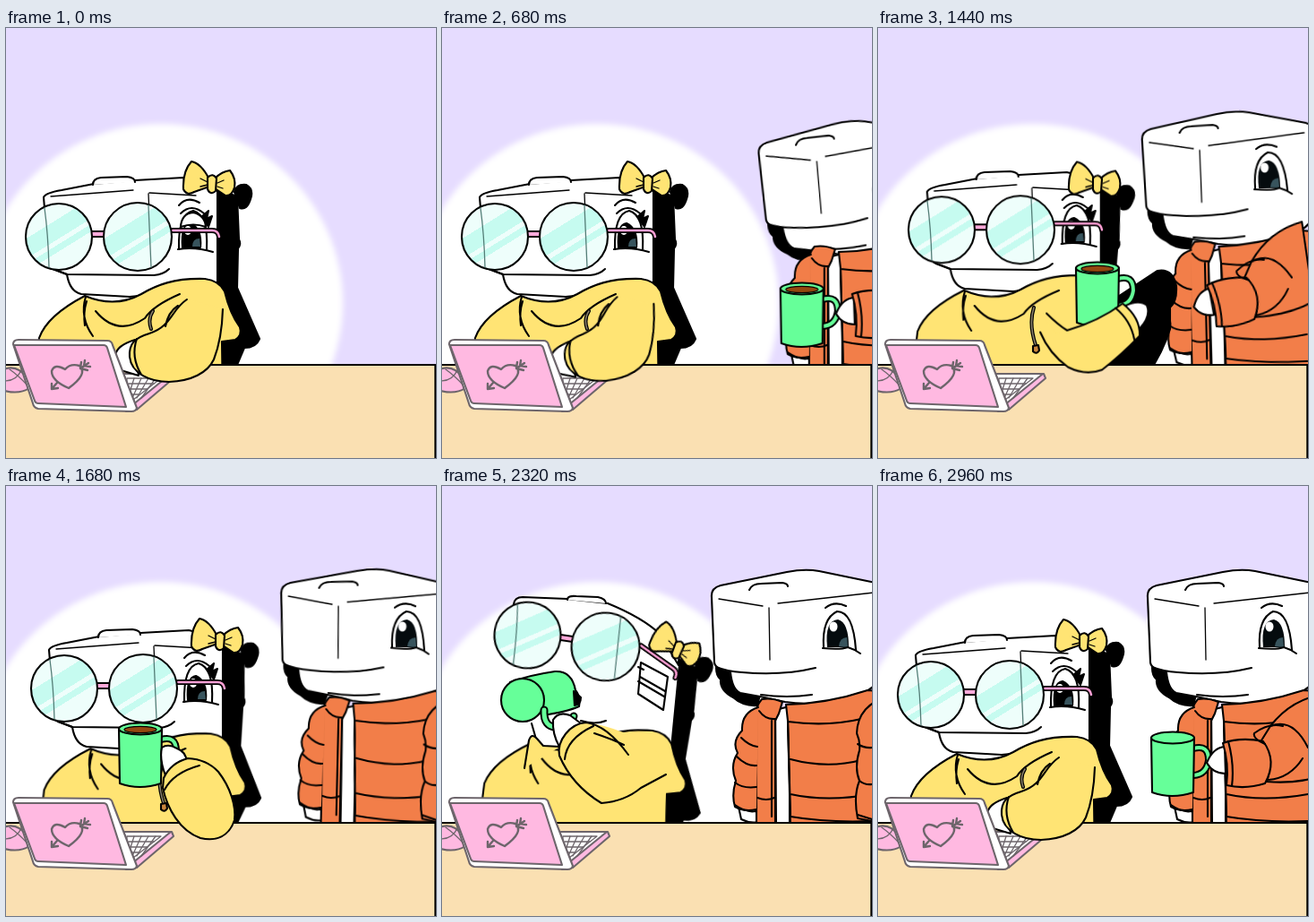
An HTML page for the animation above (3 s loop, 480 by 480 pixels).

```html
<!DOCTYPE html>
<html lang="en">
<head>
<meta charset="utf-8">
<title>Coffee break</title>
<style>
html, body { margin: 0; width: 100%; height: 100%; overflow: hidden; background: #e6dcff; }
svg { display: block; width: 100vw; height: 100vh; }
path, ellipse, circle { stroke: #000; stroke-width: 2.1; stroke-linecap: round; stroke-linejoin: round; fill: none; }
.w { fill: #fff; }
.k { fill: #000; }
.y { fill: #ffe474; }
.o { fill: #f27e49; }
.g { fill: #66ff99; }
.n { stroke: none; }
.t { stroke-width: 1.3; }
.gray path { stroke: #6d656b; }
.pink { fill: #ffb9e1; }
.lens { fill: url(#lens); }
.cord { stroke-width: 4; }
.cord + .cord { stroke: #8d846e; stroke-width: 1.5; }

.a { animation: 3s linear infinite; }
.s { animation: 3s step-end infinite; }

/* visitor */
#man { animation-name: walk; transform-origin: 400px 400px; }
@keyframes walk {
  0% { transform: translate(205px, 0); }
  8% { transform: translate(152px, 6px); }
  15% { transform: translate(107px, -4px); }
  22.67% { transform: translate(59px, 6px); }
  28% { transform: translate(22px, -11px); }
  33%, 38.7% { transform: none; }
  45% { transform: rotate(-2.6deg); }
  54%, 58.7% { transform: translateY(-1px) rotate(1.3deg); }
  72%, 80% { transform: none; }
  88%, 90% { transform: rotate(-3deg); }
  96%, 100% { transform: none; }
}
#manHead { animation-name: nod; transform-origin: 365px 200px; }
@keyframes nod {
  0%, 15% { transform: none; }
  22.67% { transform: translate(-1px, 7px) rotate(-4deg); }
  30%, 100% { transform: none; }
}
#grip { animation-name: grip; transform-origin: 400px 311px; }
@keyframes grip {
  0%, 15% { transform: none; }
  22.67% { transform: translate(14px, 4px); }
  29%, 38.7% { transform: none; }
  45.3% { transform: translate(-30px, -12px); }
  52% { transform: translate(13px, 12px) rotate(-17deg); }
  84% { transform: translate(21px, 20px) rotate(-17deg); }
  88% { transform: translate(13px, 12px) rotate(-17deg); }
  92% { transform: translate(-32px, -14px); }
  96%, 100% { transform: none; }
}
#manArm { animation-name: manArm; }
@keyframes manArm { 0% { opacity: 1; } 53% { opacity: 0; } 84% { opacity: 1; } }
#manMug { animation-name: manMug; }
@keyframes manMug { 0% { opacity: 1; } 45.3% { opacity: 0; } 92% { opacity: 1; } }
#down { animation-name: down; }
@keyframes down { 0% { opacity: 0; } 53% { opacity: 1; } 84% { opacity: 0; } }
.coffee { fill: #94480f; stroke-width: 1.2; animation-name: coffee; }
@keyframes coffee { 0% { opacity: 1; } 65.3% { opacity: 0; } }

/* typist */
#strap { animation-name: strap; transform-origin: 250px 376px; }
@keyframes strap {
  0%, 40% { transform: none; }
  46% { transform: rotate(4deg); }
  54%, 58.7% { transform: rotate(2.2deg); }
  74%, 79% { transform: translate(1px, 13px) rotate(8deg); }
  86%, 90% { transform: rotate(4.6deg); }
  96%, 100% { transform: none; }
}
#hoodie { animation-name: hoodie; transform-origin: 250px 376px; }
@keyframes hoodie {
  0%, 40% { transform: none; }
  46% { transform: translate(7px, -3px) rotate(1.2deg); }
  54%, 58.7% { transform: translate(5px, -3px) rotate(1deg); }
  74%, 79% { transform: translate(9px, -6px) rotate(2.2deg); }
  86%, 90% { transform: translate(7px, -3px) rotate(1.2deg); }
  96%, 100% { transform: none; }
}
#head { animation-name: head; transform-origin: 103px 233px; }
@keyframes head {
  0%, 40% { transform: none; }
  46% { transform: translate(15px, -6px); }
  54%, 58.7% { transform: translate(6px, -6px); }
  65.3% { transform: translate(20px, -28px) rotate(4deg); }
  81.3% { transform: translate(25px, -28px) rotate(4deg); }
  86%, 90% { transform: translate(18px, -6px); }
  97%, 100% { transform: none; }
}
#glasses { animation-name: glasses; transform-origin: 103px 233px; }
@keyframes glasses {
  0%, 40% { transform: none; }
  46% { transform: translate(14px, -8px); }
  54%, 58.7% { transform: translate(6px, -7px); }
  65.3% { transform: translate(20px, -31px) rotate(4deg); }
  74%, 79% { transform: translate(36px, -60px) rotate(8.4deg); }
  81.3% { transform: translate(27px, -33px) rotate(4deg); }
  86%, 90% { transform: translate(16px, -10px); }
  97%, 100% { transform: none; }
}
#temple { animation-name: temple; transform-origin: 186px 226px; }
@keyframes temple {
  0%, 63% { transform: none; }
  74%, 79% { transform: rotate(27deg); }
  84%, 100% { transform: none; }
}
#bow { animation-name: bow; transform-origin: 230px 172px; }
@keyframes bow {
  0%, 40% { transform: none; }
  46% { transform: translate(17px, 1px); }
  54%, 58.7% { transform: translate(9px, -1px); }
  74%, 79% { transform: translate(34px, 9px) rotate(20deg); }
  86%, 90% { transform: translate(20px, 2px); }
  97%, 100% { transform: none; }
}
#sip { animation-name: sip; transform-origin: 250px 376px; }
@keyframes sip {
  0%, 65.3% { transform: translate(-10px, 26px) rotate(-3deg); }
  74%, 79% { transform: none; }
  81.3%, 100% { transform: translate(-8px, 22px) rotate(-3deg); }
}
.awake { animation-name: awake; }
@keyframes awake { 0% { opacity: 1; } 65.3% { opacity: 0; } 81.3% { opacity: 1; } }
.sipping { animation-name: sipping; }
@keyframes sipping { 0% { opacity: 0; } 65.3% { opacity: 1; } 81.3% { opacity: 0; } }
#lid { animation-name: lid; }
@keyframes lid { 0% { opacity: 1; } 17% { opacity: 0; } }
#string { animation-name: string; }
@keyframes string { 0% { opacity: 0; } 46% { opacity: 1; } 65.3% { opacity: 0; } 84% { opacity: 1; } 93.3% { opacity: 0; } }

.typing { animation-name: typingOn; }
@keyframes typingOn { 0% { opacity: 1; } 42.7% { opacity: 0; } 93.3% { opacity: 1; } }
#type { animation-name: type; transform-origin: 145px 375px; }
@keyframes type {
  0%, 9%, 18.3%, 27.7%, 37.3%, 98.7%, 100% { transform: none; }
  4.7%, 13.7%, 22.67%, 32.3%, 42%, 95% { transform: translateY(2px) rotate(-5deg); }
}
.reaching { animation-name: reachOn; }
@keyframes reachOn { 0% { opacity: 0; } 42.7% { opacity: 1; } 50% { opacity: 0; } 85% { opacity: 1; } 93.3% { opacity: 0; } }
#reach { animation-name: reach; }
@keyframes reach {
  0%, 42.7% { transform: translate(-40px, 5px); }
  45.3%, 46% { transform: none; }
  50%, 85% { transform: translate(-45px, 3px); }
  88%, 91% { transform: none; }
  93.3%, 100% { transform: translate(-35px, 5px); }
}
.holding { animation-name: holdOn; }
@keyframes holdOn { 0% { opacity: 0; } 50% { opacity: 1; } 65.3% { opacity: 0; } 81.3% { opacity: 1; } 85% { opacity: 0; } }
#hold { animation-name: hold; }
@keyframes hold {
  0%, 50% { transform: translate(55px, -5px); }
  55%, 59% { transform: none; }
  65.3%, 81.3% { transform: translate(-16px, -26px); }
  85%, 100% { transform: translate(55px, -5px); }
}
#herMug { animation-name: herMug; }
@keyframes herMug { 0% { opacity: 0; } 45.3% { opacity: 1; } 65.3% { opacity: 0; } 81.3% { opacity: 1; } 92% { opacity: 0; } }
#pass { animation-name: pass; transform-origin: 329px 310px; }
@keyframes pass {
  0%, 45.3% { transform: translate(-37px, -12px); }
  50% { transform: translate(-118px, -14px); }
  55%, 59% { transform: translate(-179px, -10px); }
  65.3%, 81.3% { transform: translate(-196px, -37px) rotate(-12deg); }
  85% { transform: translate(-95px, -15px); }
  88%, 90% { transform: translate(-37px, -17px) rotate(4deg); }
  92%, 100% { transform: translate(-37px, -14px); }
}
</style>
</head>
<body>
<svg viewBox="0 0 480 480">
  <defs>
    <filter id="soft"><feGaussianBlur stdDeviation="3"/></filter>
    <linearGradient id="lens" x1=".1" y1="0" x2=".72" y2="1">
      <stop offset=".34" stop-color="#eefefb"/><stop offset=".34" stop-color="#c6fbf0"/>
      <stop offset=".56" stop-color="#c6fbf0"/><stop offset=".56" stop-color="#eefefb"/>
      <stop offset=".62" stop-color="#eefefb"/><stop offset=".62" stop-color="#c6fbf0"/>
      <stop offset=".7" stop-color="#c6fbf0"/><stop offset=".7" stop-color="#eefefb"/>
    </linearGradient>
    <g id="mug">
      <path d="M352 293Q369 288 369 306Q367 322 352 323" style="stroke-width:8"/>
      <path d="M352 293Q369 288 369 306Q367 322 352 323" style="stroke:#66ff99;stroke-width:4"/>
      <path class="g" d="M305 281L306 342Q328 350 352 342L353 281"/>
      <ellipse class="g" cx="329" cy="281" rx="24" ry="6.5"/>
    </g>
  </defs>

  <path class="n" d="M0 0H480V480H0Z" style="fill:#e6dcff"/>
  <ellipse class="w n" cx="173" cy="307" rx="203" ry="200" filter="url(#soft)"/>

  <g id="man" class="a">
    <g id="manHead" class="a">
      <path class="k" d="M306 203L322 208L327 229L355 233L352 245Q336 246 325 236Q310 228 311 216Q306 212 306 203Z"/>
      <path class="w" d="M301 124Q300 114 311 111L385 96Q405 92 421 95L484 108Q494 111 494 122L490 215Q475 235 440 240Q408 245 383 241L355 235L333 231Q324 227 322 208Q305 205 304 197Z"/>
      <path d="M306 202Q318 207 335 208Q380 212 417 203M356 233Q385 237 413 233"/>
      <path class="t" d="M309 126L358 134M375 131L482 119M365 136L366 194"/>
      <path class="w" d="M343 116Q346 109 356 109L380 108Q386 109 386 112"/>
      <path class="w" d="M426 180Q424 148 441 140Q459 140 462 183"/>
      <path class="n" d="M430 180Q427 150 442 149Q454 152 454 180Z" style="fill:#050b0e"/>
      <ellipse class="w n" cx="437" cy="157" rx="4.5" ry="5.5"/>
      <path class="n" d="M443 179Q444 169 452 169L453 180Z" style="fill:#38545d"/>
      <path d="M425 181Q445 183 453 180Q460 182 467 187M428 136Q438 128 451 134"/>
    </g>
    <path class="w" d="M372 250L373 382H388V246Z"/>
    <path class="w" d="M331 358L334 372Q344 377 353 375L350 360Z"/>
    <path class="o" d="M357 238Q368 236 380 241L376 254L372 262V382H351V255Q350 246 357 238Z"/>
    <path class="o" d="M353 247Q334 253 335 273Q323 285 330 298Q321 312 328 329Q323 345 327 358Q337 364 351 361"/>
    <path class="o" d="M384 244Q430 243 475 228L500 230V382H389L386 262Z"/>
    <path d="M334 281Q343 290 352 291M329 302Q340 313 351 312M327 331Q336 338 351 336M352 348Q362 352 371 348M354 251Q361 261 372 260M327 356Q340 365 350 363M386 263Q430 269 468 260M389 305Q430 316 468 306M389 344Q430 353 480 344M389 369Q430 376 480 374M368 262V369M386 262L389 367"/>
    <g id="down" class="s">
      <path class="o" d="M500 234Q464 244 463 276Q467 285 466 295Q460 315 466 329Q459 346 464 371L500 378"/>
      <path d="M464 288Q472 293 480 292M466 329Q472 334 480 333M464 367L480 372"/>
    </g>
    <g id="grip" class="a">
      <g id="manArm" class="s">
        <path class="o" d="M500 232Q462 237 438 268L428 284Q442 305 434 330Q470 333 500 322Z"/>
        <path d="M438 268Q463 258 480 292M436 328Q460 326 474 304"/>
        <g id="manMug" class="s">
          <use href="#mug"/>
          <ellipse class="coffee s" cx="329" cy="282" rx="18" ry="3.6"/>
        </g>
        <path class="w" d="M387 291Q374 292 367 309Q374 321 388 321Z"/>
        <path class="o" d="M385 287Q405 280 430 285Q446 307 432 332Q410 339 389 334Q392 310 385 287Z"/>
        <path d="M391 285Q398 311 395 335M432 288Q418 282 420 276Q436 264 452 268"/>
      </g>
    </g>
  </g>

  <g id="strap" class="a">
    <path class="k" d="M236 180L258 188L260 236Q263 241 259 246L258 290L283 347Q279 357 266 357L252 390H238Z"/>
    <path class="k" d="M255 183Q257 174 268 175Q277 180 273 191Q269 204 261 201Z"/>
  </g>
  <path class="k reaching s" d="M268 300L312 271Q329 268 333 288Q334 305 326 312V336Q318 362 302 385H260Z"/>

  <g id="head" class="a"><g class="awake s">
    <path class="w" d="M42 189Q44 184 62 181L98 174L144 170L198 167L236 176V290L138 300L84 297Q71 294 68 275L52 269L45 225Z"/>
    <path class="w" d="M97 175Q97 168 106 167L135 166Q144 167 144 172"/>
    <path class="t" d="M50 188L142 181M160 184L212 187M159 185L162 256"/>
    <path d="M50 268L68 275L165 276Q176 275 182 269"/>
    <path class="w" d="M193 247Q192 207 209 204Q226 209 224 247"/>
    <path class="k" d="M197 245Q195 219 206 218Q219 224 217 245Z"/>
    <ellipse class="w n" cx="203" cy="226" rx="4" ry="5"/>
    <path class="n" d="M208 244Q208 235 216 235L217 244Z" style="fill:#38545d"/>
    <path class="k" d="M218 211L226 204L224 213L230 210L226 222Z"/>
    <path d="M192 247Q211 244 231 250M193 198Q202 187 216 195M195 207Q207 195 221 207"/>
    <path id="lid" class="w s" d="M195 222Q196 207 209 206Q222 209 223 222Q209 217 195 222Z"/>
  </g></g>

  <g id="sip" class="a"><g class="sipping s">
    <path class="w n" d="M80 132Q81 124 90 124L140 126L185 131Q224 147 243 165L264 200L255 292H125L106 288L100 265Q68 230 72 185Z"/>
    <path d="M130 292Q112 293 106 286L100 265M72 185L80 132Q81 124 90 124L140 126L185 131Q224 147 243 165L264 200"/>
    <path class="w" d="M140 127Q140 122 150 123L174 124Q183 126 183 131"/>
    <path class="w" d="M222 197L252 213L247 250L219 232Z"/>
    <path d="M221 213L249 229M219 218L248 235M225 205L219 202M155 262Q171 267 183 262"/>
  </g></g>

  <g id="glasses" class="a">
    <g id="temple" class="a">
      <path d="M186 226H230Q237 226 238 233" style="stroke-width:6"/>
      <path d="M186 226H230Q237 226 238 233" style="stroke:#ff9fd5;stroke-width:2.5"/>
    </g>
    <path d="M96 230H109" style="stroke-width:8;stroke-linecap:butt"/>
    <path d="M96 230H109" style="stroke:#ffa9da;stroke-width:4"/>
    <circle class="lens" cx="59" cy="233" r="37"/>
    <circle class="lens" cx="147" cy="233" r="38"/>
    <path class="t" d="M43 201Q47 230 48 267M159 198L162 267" style="stroke:#547d77"/>
  </g>

  <g id="bow" class="a">
    <path class="y" d="M227 169Q218 151 207 149Q197 160 198 180Q202 188 210 183L227 177Z"/>
    <path class="y" d="M233 168Q241 160 250 159Q257 168 255 178Q252 188 245 187L233 179Z"/>
    <path class="y" d="M225 167Q231 161 235 168L234 182Q228 187 225 180Z"/>
    <path class="t" d="M217 168L225 172M217 177L225 175M236 173L243 170M236 177L242 179"/>
  </g>

  <g id="hoodie" class="a">
    <path class="y" d="M88 299C65 311 44 326 37 346L30 420H242L241 350L256 348Q264 343 261 334Q250 319 244 294Q238 282 222 280C187 279 168 287 151 297Q122 313 88 299Z"/>
    <path d="M89 300Q82 323 97 344M90 305Q86 318 88 332M100 316Q124 345 155 324Q164 310 194 297"/>
    <g class="typing s">
      <path class="cord" d="M164 316Q158 325 162 336"/>
      <path class="cord" d="M164 316Q158 325 162 336"/>
    </g>
  </g>
  <g id="string" class="s">
    <path class="cord" d="M174 312Q168 330 176 354"/>
    <path class="cord" d="M174 312Q168 330 176 354"/>
    <path d="M173 355L179 354L180 360Q177 365 173 361Z" style="fill:#c9863c"/>
  </g>

  <path d="M-5 376H479.3V485H-5Z" style="fill:#fae0b2"/>

  <g class="gray">
    <path class="pink" d="M-5 382Q12 374 24 391L26 402Q14 410 -5 404Z"/>
    <path d="M-2 394Q12 394 17 382M4 381Q14 388 24 399" class="t"/>
    <path class="pink" d="M120 386H185L187 391L146 426L134 428Z"/>
    <path class="w" d="M118 386H184L141 421H130Z"/>
    <path class="t" d="M135 391H173L142 415L134 413Z"/>
    <path id="keys" class="t"/>
  </g>

  <g id="pass" class="a"><g id="herMug" class="s">
    <use href="#mug"/>
    <ellipse class="coffee s" cx="329" cy="282" rx="18" ry="3.6"/>
  </g></g>

  <g class="sipping s">
    <path class="g" d="M76 219Q98 211 126 207Q145 206 149 228Q155 235 153 246Q140 252 112 256Z"/>
    <path class="k" d="M147 229L155 236Q155 244 148 245Z"/>
    <circle class="g" cx="90" cy="239" r="24"/>
    <path d="M114 250Q113 270 129 269Q143 268 147 257" style="stroke-width:9"/>
    <path d="M114 250Q113 270 129 269Q143 268 147 257" style="stroke:#66ff99;stroke-width:5"/>
    <path class="y" d="M92 315L97 284Q100 275 106 282L113 290L132 291"/>
    <path class="w" d="M124 261Q130 251 143 256L155 265Q138 275 131 291Q123 277 124 261Z"/>
    <path class="y n" d="M131 301C128 284 143 265 161 264Q205 270 240 297L250 322Q207 350 178 354Q145 334 131 301Z"/>
    <path d="M208 300Q184 267 161 264C143 265 128 284 131 301Q145 334 178 354Q204 352 222 337L250 322M137 305Q139 282 169 268M170 276Q191 283 203 289"/>
  </g>

  <g id="hold" class="a"><g class="holding s">
    <path class="w" d="M174 292Q181 287 191 293Q203 298 201 310L178 323Q171 305 174 292Z"/>
    <path class="y" d="M176 326Q184 309 203 304Q224 305 237 319C251 337 257 358 255 373C249 391 235 397 217 393C194 385 180 360 175 337Z"/>
    <path d="M177 339Q187 320 216 312"/>
  </g></g>

  <g id="reach" class="a"><g class="reaching s">
    <path class="w" d="M298 309Q314 301 323 308Q328 320 315 334Z"/>
    <path class="y n" d="M203 318L222 340Q265 330 296 306Q316 322 315 342Q294 364 273 380Q255 387 235 377Q214 362 203 338Z"/>
    <path d="M234 336Q269 326 296 306Q316 322 315 342Q294 364 273 380Q255 387 235 377Q214 362 204 338M288 311Q305 325 309 346M211 317Q224 330 234 336"/>
  </g></g>

  <g id="type" class="a"><g class="typing s">
    <path class="w" d="M144 348Q124 354 122 365L128 382L148 388Z"/>
    <path class="y" d="M202 303C184 315 185 333 160 341C143 346 137 353 138 367C140 386 161 395 182 395C207 394 225 385 232 370Q241 347 242 314"/>
    <path d="M178 333Q181 317 192 310M146 347Q139 367 151 387"/>
  </g></g>

  <g class="gray">
    <path class="w" d="M8 353Q8 348 14 348L113 349Q118 349 119 354L146 424Q145 428 140 428L36 425Q31 424 30 419Z"/>
    <path class="pink" d="M9 354L109 354Q112 354 113 357L134 423L36 419Q33 419 32 416Z"/>
    <path d="M70 402Q51 394 51 383Q54 374 66 381Q72 374 82 377Q92 386 70 402ZM57 396L51 403M83 380L92 374M84 373L83 380L91 382M88 371L87 377L94 378M51 397L51 403L58 402" style="stroke-width:2.4"/>
  </g>
</svg>
<script>
// Keyboard grid, slanted toward the viewer
let d = '';
for (let i = 1; i < 4; i++) d += `M${135 + i * 2} ${391 + i * 6}H${173 - i * 8}`;
for (let i = 1; i < 5; i++) d += `M${135 + i * 8} 391L${131 + i * 5} 413`;
document.getElementById('keys').setAttribute('d', d);
</script>
</body>
</html>
```
